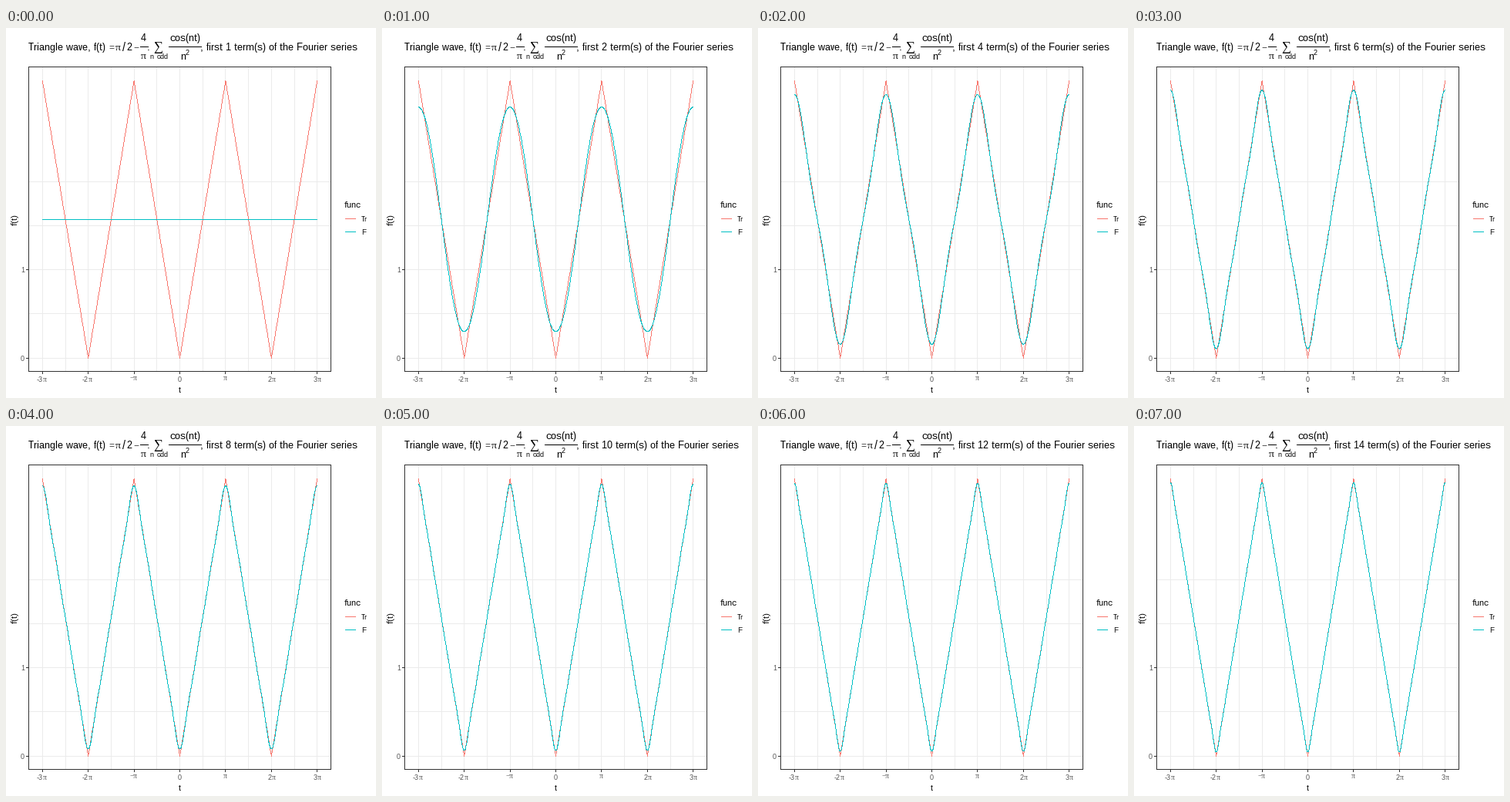
Write a matplotlib script that moves like this. It is 480 px wide and 480 px high and loops after 8 s.

```python
import numpy as np
import matplotlib.pyplot as plt
from matplotlib.animation import FuncAnimation
from matplotlib.collections import LineCollection

SIZE, DPI = 480, 80
PT = 72 / DPI  # points per pixel
plt.rcParams.update({"text.hinting": "native", "text.hinting_factor": 1})

SALMON, TEAL = "#F8766D", "#00BFC4"
GRID, DARK, TICK_TEXT = "#EBEBEB", "#333333", "#4D4D4D"
LEFT, RIGHT, TOP, BOTTOM = 29, 421, 50, 445
X0, Y0 = 225.5, 428.04      # pixel position of t = 0, f = 0
X_PI, Y_UNIT = 59.4, 114.4  # pixels per pi, pixels per unit

fig = plt.figure(figsize=(SIZE / DPI, SIZE / DPI), dpi=DPI, facecolor="white")
ax = fig.add_axes([0, 0, 1, 1])
ax.set(xlim=(0, SIZE), ylim=(SIZE, 0))
ax.axis("off")


def px(t):
    return X0 + np.asarray(t) / np.pi * X_PI


def py(y):
    return Y0 - np.asarray(y) * Y_UNIT


def hline(x1, x2, y, color, z=2):
    """Fill the pixels x1..x2 of row y."""
    ax.plot([x1, x2 + 1], [y + 0.5, y + 0.5], color=color, lw=PT,
            solid_capstyle="butt", snap=False, zorder=z)


def vline(x, y1, y2, color, z=2):
    """Fill the pixels y1..y2 of column x."""
    ax.plot([x + 0.5, x + 0.5], [y1, y2 + 1], color=color, lw=PT,
            solid_capstyle="butt", snap=False, zorder=z)


def pixel_path(x, y):
    """Trace a polyline as one-pixel dashes, without smoothing."""
    points = np.floor(np.column_stack([x, y]))
    parts = [points[:1]]
    for a, b in zip(points[:-1], points[1:]):
        n = int(np.abs(b - a).max())
        if n:
            step = np.arange(1, n + 1)[:, None] / n
            parts.append(np.floor(a + (b - a) * step + 0.5))
    cells = np.unique(np.concatenate(parts), axis=0)
    return np.stack([cells + [0, 0.5], cells + [1, 0.5]], axis=1)


def curve(color, z):
    lines = LineCollection([], colors=color, linewidths=PT, capstyle="butt",
                           zorder=z)
    lines.set_snap(False)
    return ax.add_collection(lines, autolim=False)


def label(x, y, s, size=13, color="black", font="Liberation Sans", **kw):
    kw = {"ha": "left", "va": "baseline", **kw}
    return ax.text(x, y, s, fontsize=size * PT, color=color, family=font, **kw)


def symbol(x, y, s, size=13, **kw):
    return label(x, y, s, size, font="Liberation Serif", **kw)


def x_tick_label(k, x):
    if k == 0:
        label(x, 459, "0", 9, TICK_TEXT, ha="center")
    elif abs(k) == 1:
        symbol(x, 457, "π" if k > 0 else "−π", 9, color=TICK_TEXT, ha="center")
    else:
        label(x + 1, 459, f"{k}", 9, TICK_TEXT, ha="right")
        symbol(x + 1, 459, "π", 9, color=TICK_TEXT)


def draw_panel():
    for half in range(-6, 7):
        vline(np.floor(px(half * np.pi / 2)), TOP, BOTTOM, GRID, 0)
    for v in np.arange(0, 2.1, 0.5):
        hline(LEFT, RIGHT, np.floor(py(v)), GRID, 0)
    for y in (TOP, BOTTOM):
        hline(LEFT, RIGHT, y, DARK, 5)
    for x in (LEFT, RIGHT):
        vline(x, TOP, BOTTOM, DARK, 5)
    for k in range(-3, 4):
        x = np.floor(px(k * np.pi))
        vline(x, BOTTOM + 1, BOTTOM + 3, DARK)
        x_tick_label(k, x)
    for v in (0, 1):
        y = np.floor(py(v))
        hline(LEFT - 3, LEFT - 1, y, DARK)
        label(24, y + 4, f"{v}", 9, TICK_TEXT, ha="right")
    label(225, 473, "t", 11, ha="center")
    label(17, 248, "f(t)", 11, rotation=90, ha="right", va="center")


def draw_legend():
    label(439, 233, "func", 11)
    for y, color, name in ((247, SALMON, "Tr"), (264, TEAL, "F")):
        hline(440, 453, y, color)
        label(461, y + 4, name, 9)


def draw_formula():
    label(29, 29, "Triangle wave, f(t)")
    symbol(133, 29, "=")
    symbol(142, 29, "π")
    label(151, 30, "/", 16)
    label(156, 29, "2")
    symbol(165, 29, "−")
    label(175, 17, "4")
    hline(174, 184, 24, "black")
    symbol(175, 40, "π")
    label(183, 29, ".")
    symbol(191, 29, "∑", 17)
    label(186, 40, "n", 9)
    label(196, 40, "odd", 9)
    label(212, 17, "cos(nt)")
    hline(211, 253, 24, "black")
    label(226, 41, "n")
    label(233, 35, "2", 9)


draw_panel()
draw_legend()
draw_formula()

t = np.linspace(-3 * np.pi, 3 * np.pi, 1885)
triangle = np.abs((t + np.pi) % (2 * np.pi) - np.pi)
curve(SALMON, 3).set_segments(pixel_path(px(t), py(triangle)))
series = curve(TEAL, 4)
ending = label(252, 29, "")


def update(step):
    n = np.arange(1, 2 * step, 2)[:, None]
    f = np.pi / 2 - 4 / np.pi * (np.cos(n * t) / n**2).sum(axis=0)
    series.set_segments(pixel_path(px(t), py(f)))
    terms = max(1, 2 * step)
    ending.set_text(f", first {terms} term(s) of the Fourier series")
    return series, ending


anim = FuncAnimation(fig, update, frames=8, interval=1000, repeat=True)
plt.show()
```
